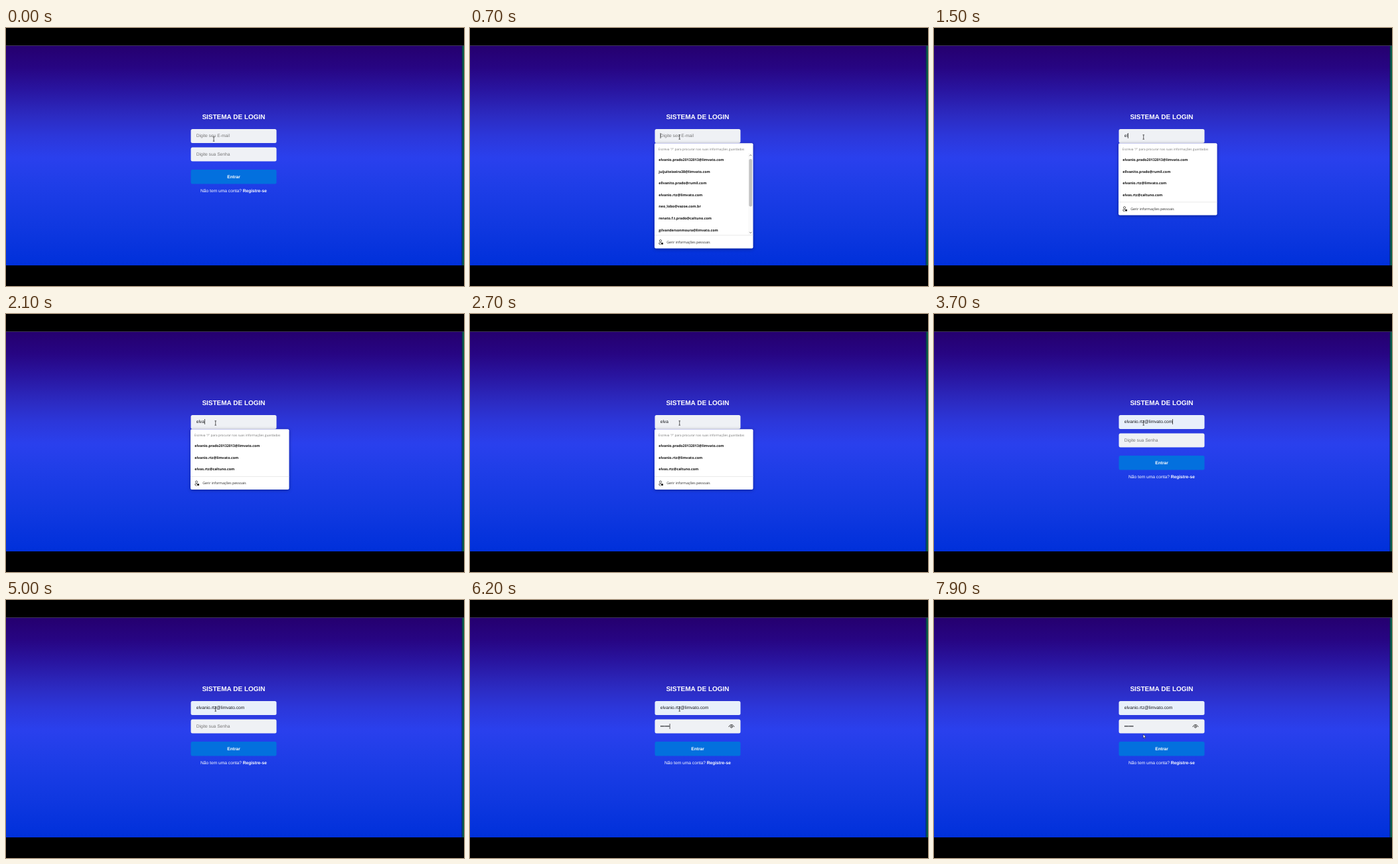
These frames come from a looping animation (690 by 388 pixels, 8000 ms). An HTML page:

```html
<!DOCTYPE html>
<html lang="pt">
<head>
<meta charset="utf-8">
<title>Sistema de login</title>
<style>
  html, body { margin: 0; width: 100%; height: 100%; overflow: hidden; background: #000; }
  svg { display: block; width: 100%; height: 100%; }
  text { font: 6.667px "Liberation Sans", Arial, sans-serif; fill: #fff; white-space: pre; text-rendering: geometricPrecision; }
  .bold { font-weight: 700; }
  .title { font-size: 10px; font-weight: 700; }
  .middle { text-anchor: middle; }
  text.value { fill: #16181c; }
  text.hint { fill: #757575; }
  #menu text { font-family: "Open Sans", "Noto Sans", sans-serif; fill: #111; }
  #menu .row { font-size: 5.3px; font-weight: 700; }
  #menu .note { font-size: 4.77px; fill: #767676; }
  #menu .manage { font-size: 5.17px; fill: #222; }
  #panel { filter: drop-shadow(0 1.5px 2.5px rgba(0, 0, 30, .4)); }
</style>
</head>
<body>
<svg viewBox="0 0 690 388">
  <defs>
    <linearGradient id="sky" gradientUnits="userSpaceOnUse" x1="0" y1="27" x2="0" y2="357">
      <stop offset="0" stop-color="#25006f"/>
      <stop offset=".1" stop-color="#270583"/>
      <stop offset=".2" stop-color="#2915a0"/>
      <stop offset=".32" stop-color="#2c2bc2"/>
      <stop offset=".41" stop-color="#2c37da"/>
      <stop offset=".51" stop-color="#2a40ed"/>
      <stop offset=".62" stop-color="#203ee8"/>
      <stop offset=".82" stop-color="#1038e0"/>
      <stop offset="1" stop-color="#0030da"/>
    </linearGradient>
    <clipPath id="listClip"><rect id="listArea" x="278" y="186" width="148.5" height="125"/></clipPath>
  </defs>

  <rect width="690" height="388"/>
  <rect y="26.5" width="690" height="330.5" fill="url(#sky)"/>
  <rect y="26" width="690" height=".8" fill="#45405c"/>
  <rect x="686.5" y="27" width="1" height="330" fill="#0a2250"/>
  <rect x="687.5" y="27" width="2.5" height="330" fill="#075c46"/>

  <text class="title middle" x="343" y="137">SISTEMA DE LOGIN</text>
  <rect id="emailBox" x="278.5" y="152" width="129" height="21" rx="2.5"/>
  <text id="email" x="286.7" y="164.4"></text>
  <rect x="278.5" y="179.5" width="129" height="21" rx="2.5" fill="#eff1f5"/>
  <text id="password" x="286.7" y="192"></text>
  <g id="eye" fill="none" stroke="#222" stroke-width=".9" stroke-linecap="round">
    <path d="M390 190.6C391.4 186.4 396.4 186.4 397.8 190.6"/>
    <circle cx="393.9" cy="190.6" r="1.5"/>
  </g>
  <rect x="278.5" y="213" width="129" height="21.5" rx="2.5" fill="#0370de"/>
  <text class="bold middle" x="343" y="226">Entrar</text>
  <text class="middle" x="343" y="246.5">Não tem uma conta? <tspan class="bold">Registre-se</tspan></text>

  <g id="menu">
    <rect id="panel" x="278" y="173.3" width="148.5" rx="2" fill="#fff"/>
    <text class="note" x="283.8" y="183.6">Escreva "/" para procurar nas suas informações guardadas</text>
    <rect id="mark" x="278" width="148.5" height="17.6" fill="#e9e9ec"/>
    <g id="rows" clip-path="url(#listClip)"></g>
    <g id="scroll">
      <rect x="419" y="188" width="7" height="123" fill="#fafafa"/>
      <rect x="420.3" y="197" width="4.8" height="71.5" rx="2.2" fill="#c2c2c2"/>
      <path d="M421 192.3l1.7-1.7 1.7 1.7M421 306.8l1.7 1.7 1.7-1.7" fill="none" stroke="#666" stroke-width=".8"/>
    </g>
    <g id="foot">
      <rect x="278" width="148.5" height=".6" fill="#dcdcdc"/>
      <text class="manage" x="296.2" y="12.3">Gerir informações pessoais</text>
      <g fill="none" stroke="#222" stroke-width=".7">
        <circle cx="287" cy="8.6" r="1.6"/>
        <path d="M288 11.6h-3.2q-.7 2.6 2.6 2.6"/>
      </g>
      <rect x="288" y="11.2" width="3" height="2.8" rx=".5" fill="#222"/>
    </g>
  </g>

  <rect id="caret" width=".7" height="8" fill="#111"/>
  <path id="beam" d="M-1.3-3.2H1.3M0-3.2V3.2M-1.3 3.2H1.3" fill="none" stroke="#222" stroke-width=".7"/>
  <path id="arrow" d="M0 0V5.6L1.3 4.5 2.2 6.5 3.1 6.1 2.2 4.1H3.9Z" fill="#fff" stroke="#111" stroke-width=".5"/>
</svg>

<script>
const LOOP = 8000, ROW = 17.6, LIST_TOP = 189.6;
const el = id => document.getElementById(id);
const set = (id, attrs) => {
  for (const key in attrs) el(id).setAttribute(key, attrs[key]);
};

const contacts = [
  "elvanio.prado20132013@limvato.com",
  "juijuiteixeira38@limvato.com",
  "ellvanito.prado@rumil.com",
  "elvanio.rtz@limvato.com",
  "neo_lobo@vazoe.com.br",
  "renato.f.t.prado@caltuno.com",
  "gilvandersonmoura@limvato.com",
  "elvas.rtz@caltuno.com"
];
const chosen = contacts[3];

// Each step changes only the listed parts of the state.
const steps = [
  [0, { email: "", query: "", dots: 0, filled: false, menu: 0, mark: -1, caret: "", beam: [313, 167], arrow: null }],
  [100, { beam: [314, 166] }],
  [200, { beam: [315, 164.5] }],
  [300, { beam: [315.7, 164], caret: "email" }],
  [500, { menu: .5 }],
  [600, { menu: .9 }],
  [700, { menu: 1 }],
  [900, { caret: "" }],
  [1400, { email: "e", query: "e", caret: "email" }],
  [1500, { email: "el", query: "el" }],
  [1700, { email: "elv", query: "el" }],
  [1800, { email: "elva" }],
  [1900, { query: "elva" }],
  [2400, { caret: "" }],
  [2800, { email: contacts[0], filled: true, mark: 0 }],
  [3000, { email: chosen, mark: 1 }],
  [3500, { menu: .6 }],
  [3600, { menu: .2, caret: "email" }],
  [3700, { menu: 0, mark: -1 }],
  [4100, { caret: "" }],
  [4400, { caret: "password" }],
  [5000, { caret: "" }],
  [5200, { dots: 1, caret: "password" }],
  [5500, { dots: 2 }],
  [5700, { dots: 3 }],
  [5800, { dots: 4 }],
  [6000, { dots: 5 }],
  [6200, { dots: 6 }],
  [6700, { caret: "" }],
  [7200, { caret: "password" }],
  [7800, { caret: "", beam: [314.5, 184] }],
  [7900, { beam: null, arrow: [315.2, 202] }]
];

function showField(id, value, hint) {
  el(id).textContent = value || hint;
  el(id).setAttribute("class", value ? "value" : "hint");
}

function showPointer(id, point) {
  set(id, { opacity: point ? 1 : 0 });
  if (point) set(id, { transform: `translate(${point})` });
}

function showMenu({ menu, query, mark }) {
  set("menu", { opacity: menu });
  const found = contacts.filter(name => name.startsWith(query));
  const scrolls = found.length > 6;
  const end = scrolls ? 311.5 : LIST_TOP + found.length * ROW + 1.6;
  el("rows").innerHTML = found.map((name, i) =>
    `<text class="row" x="284.3" y="${LIST_TOP + i * ROW + 10.4}">${name}</text>`).join("");
  set("listArea", { height: end - 186 });
  set("panel", { height: end + 20 - 173.3 });
  set("foot", { transform: `translate(0 ${end})` });
  set("scroll", { opacity: scrolls ? 1 : 0 });
  set("mark", { y: LIST_TOP + mark * ROW, opacity: mark < 0 ? 0 : 1 });
}

function render(state) {
  const password = "•".repeat(state.dots);
  showField("email", state.email, "Digite seu E-mail");
  showField("password", password, "Digite sua Senha");
  set("emailBox", { fill: state.filled ? "#e8f0fb" : "#eff1f5" });
  set("eye", { opacity: state.dots ? 1 : 0 });
  showMenu(state);

  set("caret", { opacity: state.caret ? 1 : 0 });
  if (state.caret) {
    const empty = !(state.caret === "email" ? state.email : password);
    const width = empty ? 0 : el(state.caret).getComputedTextLength();
    set("caret", { x: 286.7 + width, y: state.caret === "email" ? 158 : 186 });
  }
  showPointer("beam", state.beam);
  showPointer("arrow", state.arrow);
}

const start = performance.now();
let shown = -1;
function tick() {
  const time = (performance.now() - start) % LOOP;
  const count = steps.filter(([at]) => at <= time).length;
  if (count !== shown) {
    shown = count;
    render(Object.assign({}, ...steps.slice(0, count).map(step => step[1])));
  }
  requestAnimationFrame(tick);
}
tick();
</script>
</body>
</html>
```
